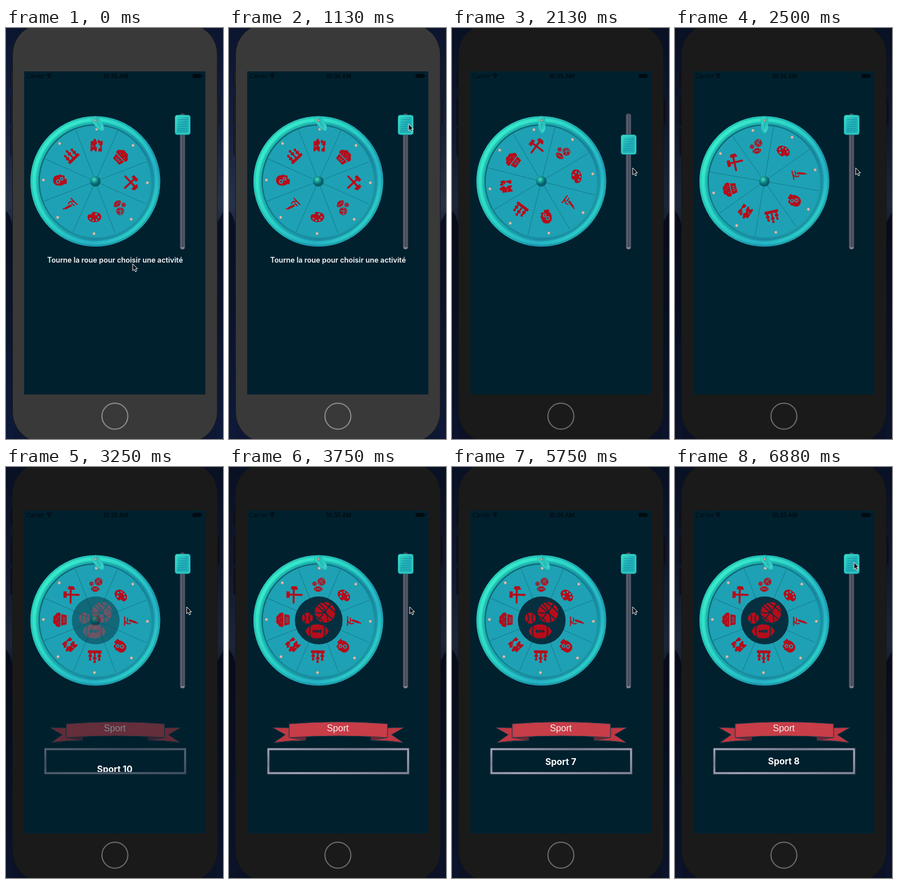
Recreate the animation shown at these times as an HTML page. Size 382x720 px, loop 7.01 s.

```html
<!DOCTYPE html>
<html lang="fr">
<head>
<meta charset="utf-8">
<title>Roue des activités</title>
<style>
  html, body { margin: 0; width: 100%; height: 100%; overflow: hidden; background: #070d1e; }
  svg { display: block; width: 100vw; height: 100vh; }
  text { text-anchor: middle; font-family: Inter, sans-serif; }
  .bezel { fill: #393939; stroke: #141519; stroke-width: 1; }
  .button { fill: #20222a; stroke: #090b12; stroke-width: 1; }
  .home { fill: none; stroke: #8d8d8d; stroke-width: 2; }
  .shade { opacity: 0; }
  .dim .bezel { fill: #1a1a1a; }
  .dim .home { stroke: #6c6c6c; }
  .dim .button { fill: #101116; }
  .dim .shade { opacity: .25; }
  .icon { fill: #b50d1b; stroke: none; }
  .line { fill: none; stroke: #b50d1b; stroke-linecap: round; }
  .seam { fill: none; stroke: currentColor; }
  .status { fill: #000a10; font-size: 9.8px; }
  .item { fill: #fff; font-size: 15.5px; font-weight: 700; }
</style>
</head>
<body>
<svg id="stage" viewBox="0 0 382 720" preserveAspectRatio="none">
  <defs>
    <linearGradient id="sky" x2="0" y2="1">
      <stop offset="0" stop-color="#0b1530"/><stop offset=".25" stop-color="#15203b"/>
      <stop offset=".43" stop-color="#26324a"/><stop offset=".47" stop-color="#1d2840"/>
      <stop offset="1" stop-color="#0d1733"/>
    </linearGradient>
    <linearGradient id="ground" x2="0" y2="1">
      <stop offset="0" stop-color="#080f22"/><stop offset=".4" stop-color="#0a1329"/>
      <stop offset="1" stop-color="#0e1a3a"/>
    </linearGradient>
    <linearGradient id="rim" x1="0" y1=".2" x2="1" y2=".8">
      <stop offset="0" stop-color="#1fc0af"/><stop offset=".4" stop-color="#1aa8ae"/>
      <stop offset=".7" stop-color="#1888a2"/><stop offset="1" stop-color="#1a98a6"/>
    </linearGradient>
    <linearGradient id="gloss" x1=".05" y1=".1" x2=".95" y2=".9">
      <stop offset="0" stop-color="#3df0cd"/><stop offset=".45" stop-color="#2bd3c6"/>
      <stop offset=".75" stop-color="#25b2c6"/><stop offset="1" stop-color="#30dac6"/>
    </linearGradient>
    <linearGradient id="innerShade" x2="1" y2="1">
      <stop offset="0" stop-color="#0b5866"/><stop offset=".5" stop-color="#0f6f80" stop-opacity=".7"/>
      <stop offset="1" stop-color="#2bb5c0" stop-opacity=".6"/>
    </linearGradient>
    <filter id="soft"><feGaussianBlur stdDeviation="1.3"/></filter>
    <radialGradient id="hub" cx=".38" cy=".32">
      <stop offset="0" stop-color="#4fe0c0"/><stop offset=".5" stop-color="#149a94"/>
      <stop offset="1" stop-color="#06606a"/>
    </radialGradient>
    <linearGradient id="rail">
      <stop offset="0" stop-color="#1d2431"/><stop offset=".25" stop-color="#646b7b"/>
      <stop offset=".5" stop-color="#3f4656"/><stop offset=".8" stop-color="#596070"/>
      <stop offset="1" stop-color="#1c2430"/>
    </linearGradient>
    <linearGradient id="knobFill" x2="1" y2="1">
      <stop offset="0" stop-color="#34dcc6"/><stop offset=".5" stop-color="#20b0b8"/>
      <stop offset="1" stop-color="#1fb3b4"/>
    </linearGradient>
    <linearGradient id="needleFill" x2="1" y2="1">
      <stop offset="0" stop-color="#49e6cf"/><stop offset=".5" stop-color="#22bdb9"/>
      <stop offset="1" stop-color="#4be8d8"/>
    </linearGradient>
    <linearGradient id="steel" x2="1" y2="1">
      <stop offset="0" stop-color="#b9bccb"/><stop offset=".3" stop-color="#83879a"/>
      <stop offset=".6" stop-color="#c0c0cd"/><stop offset="1" stop-color="#8d91a4"/>
    </linearGradient>
    <clipPath id="slot"><rect x="71" y="497" width="242" height="37"/></clipPath>

    <g id="balls">
      <circle class="icon" cx="11" cy="-14" r="18"/>
      <path class="seam" stroke-width="1.7" d="M-3-25L24-2M22-28L-1-1M1-29Q16-18 16 3M-6-14Q12-8 20-29M6-32Q24-20 29-13M-6-8Q8 0 7 3"/>
      <circle class="icon" cx="-20" cy="-4" r="9.7"/>
      <path class="seam" stroke-width="1.7" d="M-26-12Q-20-4-26 4M-14-12Q-20-4-14 4"/>
      <path class="icon" d="M-23 19C-19 9-11 7-3 7S13 9 17.5 19C13 29 5 31.5-3 31.5S-19 29-23 19Z"/>
      <path class="seam" stroke-width="1.7" d="M-14 8Q-18 19-14 30M8.5 8Q12.5 19 8.5 30M-11 19H5M-9 16v6M-5 16v6M-1 16v6M3 16v6"/>
    </g>
  </defs>

  <rect width="382" height="720" fill="url(#sky)"/>
  <path d="M0 320Q8 328 12 348V720H0ZM382 322Q374 338 370 344V720H382Z" fill="url(#ground)"/>
  <rect class="shade" width="382" height="720"/>
  <rect class="button" x="8.5" y="74" width="6" height="28" rx="2"/>
  <rect class="button" x="8.5" y="123" width="6" height="47" rx="2"/>
  <rect class="button" x="8.5" y="177" width="6" height="46" rx="2"/>
  <rect class="button" x="369" y="123" width="6" height="47" rx="2"/>
  <rect class="bezel" x="11.5" y="-7" width="360.5" height="733" rx="53"/>
  <circle class="home" cx="191.7" cy="680" r="22.8"/>
  <rect x="32" y="76" width="319" height="566" fill="#01202e"/>

  <text class="status" x="52" y="87.7">Carrier</text>
  <text class="status" x="193" y="87.7" font-weight="600">10:35 AM</text>
  <g fill="none" stroke="#000a10" stroke-width="1.6">
    <path d="M71.5 82.3Q76 78.6 80.5 82.3M73.3 84.6Q76 82.4 78.7 84.6"/>
    <circle cx="76" cy="86.7" r=".6"/>
  </g>
  <path d="M329 81h14v6h-14zM344 83h1v2h-1z" fill="#000a10" stroke="#000a10"/>

  <text id="hint" x="192" y="411.4" fill="#f8fafb" font-size="12.7" font-weight="600">Tourne la roue pour choisir une activité</text>

  <g transform="translate(157.3 268.7)">
    <circle r="106.5" fill="#1ea1b4" stroke="url(#rim)" stroke-width="15.5"/>
    <circle r="108" fill="none" stroke="url(#gloss)" stroke-width="7" filter="url(#soft)"/>
    <circle r="113.6" fill="none" stroke="url(#gloss)" stroke-opacity=".6"/>
    <circle r="99" fill="none" stroke="url(#innerShade)" stroke-width="2.4"/>
    <g id="wheel" color="#1ea1b4">
      <g id="spokes"></g>
      <g transform="translate(0 -62.5)">
        <path class="icon" d="M-10-8H-5A2.5 2.5 0 1 1-1-8H1V-3A2.5 2.5 0 1 0 1 2V10H-2A2.5 2.5 0 1 0-7 10H-10ZM2-8L4-11 7-8 11-9V-2L9 0 10 3V10H4V6L7 3V-1L4-2Z"/>
        <path class="seam" stroke-width="1" d="M-9 1H-4M0 0L6-5"/>
      </g>
      <g transform="rotate(45) translate(0 -62.5)">
        <path class="icon" d="M-12 1C-14-4-11-8-8-8C-7-12-2-13 0-11C5-13 8-10 8-8C12-7 14-2 11 1ZM-10 2.5H10L8 12H-8Z"/>
        <path class="seam" d="M-4 5L-3 10M0 5V10M4 5L3 10M-6-3h2M0-6h2M4-2h2"/>
      </g>
      <g transform="rotate(90) translate(0 -62.5)">
        <path class="line" stroke-width="3.4" d="M-10 10L7-7M10 10L-7-7"/>
        <path class="icon" d="M-13-5L-5-13 -1-9 -9-1ZM3-11L8-13 14-7 12-1 7-5Z"/>
      </g>
      <use href="#balls" transform="rotate(135) translate(0 -62.5) scale(.39)"/>
      <g transform="rotate(180) translate(0 -62.5)">
        <path class="icon" d="M-12 1C-12-6-6-9 1-9S13-4 12 1S7 4 5 5S7 9 1 9S-12 7-12 1Z"/>
        <g fill="currentColor"><circle cx="-7" r="1.7"/><circle cx="-4" cy="-5" r="1.7"/><circle cx="2" cy="-6" r="1.7"/><circle cx="7" cy="-3" r="1.7"/><circle cx="-3" cy="5" r="2"/></g>
      </g>
      <g transform="rotate(225) translate(0 -62.5)">
        <path class="line" stroke-width="2" d="M-7 11H8M1 10Q7 6 4 1M-5 6H1"/>
        <path class="line" stroke-width="3.6" d="M-1 2L2-8"/>
        <path class="line" stroke-width="2" d="M3-10L3.6-12"/>
      </g>
      <g transform="rotate(270) translate(0 -62.5)">
        <path class="icon" d="M-6 12V8C-11 3-11-12 0-12C8-12 9-6 9-3L11 2H9V7Q8 9 3 8V12Z"/>
        <g class="seam" stroke-width="1.5"><circle cx="-2" cy="-3" r="2.8"/><circle cx="3" cy="3" r="2.4"/></g>
      </g>
      <g transform="rotate(315) translate(0 -62.5)">
        <path class="icon" d="M-12 5H12V10H-12Z"/>
        <path class="line" stroke-width="3" d="M-8 6V-3M0 6V-7M8 6V-3M-10 0L-8 2L-6 0M-2-4L0-2L2-4M6 0L8 2L10 0"/>
        <g class="icon"><circle cx="-8" cy="-6" r="2.3"/><circle cy="-10" r="2.3"/><circle cx="8" cy="-6" r="2.3"/></g>
      </g>
    </g>
    <circle r="9.3" fill="url(#hub)"/>
    <g id="prize" color="#06303f">
      <circle r="42" cx=".7" fill="#06303f"/>
      <use href="#balls" x=".7"/>
    </g>
    <g transform="translate(.3 -107)">
      <g id="needle">
        <path d="M-6-3Q-5-7 0-7T6-3L6.5 14Q4 22 0 23Q-4 22-6.5 14Z" fill="url(#needleFill)" stroke="#18a0a8" stroke-width=".6" fill-opacity=".92"/>
        <path d="M-3 4V15Q0 20 3 15" fill="none" stroke="#8bf5e6" stroke-opacity=".35"/>
      </g>
      <circle r="2.2" fill="#d3aa94" stroke="#4d7d7c" stroke-width=".8"/>
    </g>
  </g>

  <rect x="305.5" y="149.5" width="10.5" height="239" rx="5" fill="url(#rail)" stroke="#121a25" stroke-width=".8"/>
  <path d="M308.3 384Q311 388 313.5 384" fill="none" stroke="#a2a7b4" stroke-width="1.5"/>
  <g id="knob">
    <rect x="297.5" y="152.5" width="27" height="34.5" rx="4" fill="url(#knobFill)" stroke="#168a92" stroke-width=".8"/>
    <rect x="299.3" y="154.2" width="23.4" height="31" rx="3" fill="none" stroke="#46e6cf" stroke-opacity=".7" stroke-width="1.6"/>
    <path d="M303 160.5H319M303 164.5H319M303 168.5H319M303 172.5H319M303 176.5H319M303 180H319" stroke="#138a9c" stroke-opacity=".75"/>
  </g>

  <g id="result">
    <g stroke="#203b48" stroke-width="1">
      <path d="M77 456.5L106 457V473L135 474V479Q105 479 79 483L99 469ZM308 456.5L279 457V473L250 474V479Q281 479 307 483L286 469Z" fill="#bf3742"/>
      <path d="M106 474L135 479V472ZM279 474L250 479V472Z" fill="#7c2230"/>
      <path d="M106 450Q192 443 279 450V474Q192 468 106 474Z" fill="#c73d48"/>
    </g>
    <text x="191.5" y="463" fill="#f7eeee" font-size="16.2" style="font-family:'Liberation Sans',sans-serif">Sport</text>
    <g fill="none">
      <rect x="69.3" y="494.3" width="246" height="42" stroke="#555b70" stroke-width="4.4"/>
      <rect x="69.3" y="494.3" width="246" height="42" stroke="url(#steel)" stroke-width="2"/>
    </g>
  </g>
  <g id="reel" clip-path="url(#slot)">
    <text class="item" x="191.5"></text>
    <text class="item" x="191.5"></text>
  </g>

  <g id="cursor">
    <g id="press" fill="none">
      <circle r="15" stroke="#e8eef0" stroke-width="4.4"/>
      <circle r="15" stroke="#05090c" stroke-width="2.6"/>
    </g>
    <path d="M0 0V12.2L2.8 9.7L4.7 14L6.9 13L5 8.8H8.6Z" fill="#0a0d10" stroke="#f2f5f6" stroke-width="1"/>
  </g>
</svg>
<script>
const LOOP = 7010, STEP = 125;
const $ = id => document.getElementById(id);
const clamp = (v, lo = 0, hi = 1) => Math.min(hi, Math.max(lo, v));
const progress = (t, from, to) => clamp((t - from) / (to - from));
const smooth = p => p * p * (3 - 2 * p);
const show = (id, on) => { $(id).style.opacity = +on; };
const move = (id, value) => $(id).setAttribute('transform', value);

// time, x, y
const cursorPath = [
  [0, 223, 413], [750, 302, 196], [1125, 316, 168], [1625, 317.5, 176],
  [2000, 318, 245], [6000, 318, 245], [6500, 317, 166], [6750, 313, 163], [6875, 315, 167]
];

let spokes = '';
for (let a = 0; a < 360; a += 45) {
  spokes += `<g transform="rotate(${a})">
    <path d="M0 0V-97" transform="rotate(22.5)" stroke="#157a8a" stroke-width=".9"/>
    <circle cy="-91.5" r="2.6" fill="#e0bda6" stroke="#4f8a92" stroke-width=".6"/></g>`;
}
$('spokes').innerHTML = spokes;

function cursorAt(t) {
  const next = Math.max(1, cursorPath.findIndex(k => k[0] >= t));
  const [t0, x0, y0] = cursorPath[next - 1], [t1, x1, y1] = cursorPath[next];
  const p = smooth(progress(t, t0, t1));
  return [x0 + (x1 - x0) * p, y0 + (y1 - y0) * p];
}

function drawWheel(t) {
  const left = 1 - progress(t, 2000, 2701);
  const angle = 586 - 584.5 * left ** 3;
  const peg = (angle + 22.5) % 45 - 22.5;
  const tilt = peg > 9 ? 0 : -36 * clamp((peg + 9) / 10);
  move('wheel', `rotate(${angle})`);
  move('needle', `rotate(${tilt})`);
}

function drawReel(t) {
  const place = 38 - 28.197 * (Math.max(0, 6000 - t) / 2750) ** 1.385;
  const first = Math.floor(place);
  [...$('reel').children].forEach((item, i) => {
    const n = first + i;
    item.textContent = `Sport ${(n + 9) % 10 + 1}`;
    item.setAttribute('y', 520.5 + (n - place) * 76);
  });
  show('reel', t >= 3000);
}

function draw(t) {
  const [x, y] = cursorAt(t);
  const pressed = t >= 1625 && t < 2000;
  const pull = t <= 2000 ? clamp(y - 176, 0, 69) * (t >= 1625) : 69 * (1 - progress(t, 2000, 2250));
  const fade = progress(t, 2750, 3750);
  $('stage').classList.toggle('dim', t >= 1625);
  move('cursor', `translate(${x} ${y})`);
  move('knob', `translate(0 ${pull})`);
  show('press', pressed);
  show('hint', t < 2000);
  show('result', fade);
  show('prize', fade);
  drawWheel(t);
  drawReel(t);
}

function tick() {
  const t = performance.now() % LOOP;
  draw(Math.min(6875, Math.floor((t + 1) / STEP) * STEP));
  requestAnimationFrame(tick);
}
tick();
</script>
</body>
</html>
```
